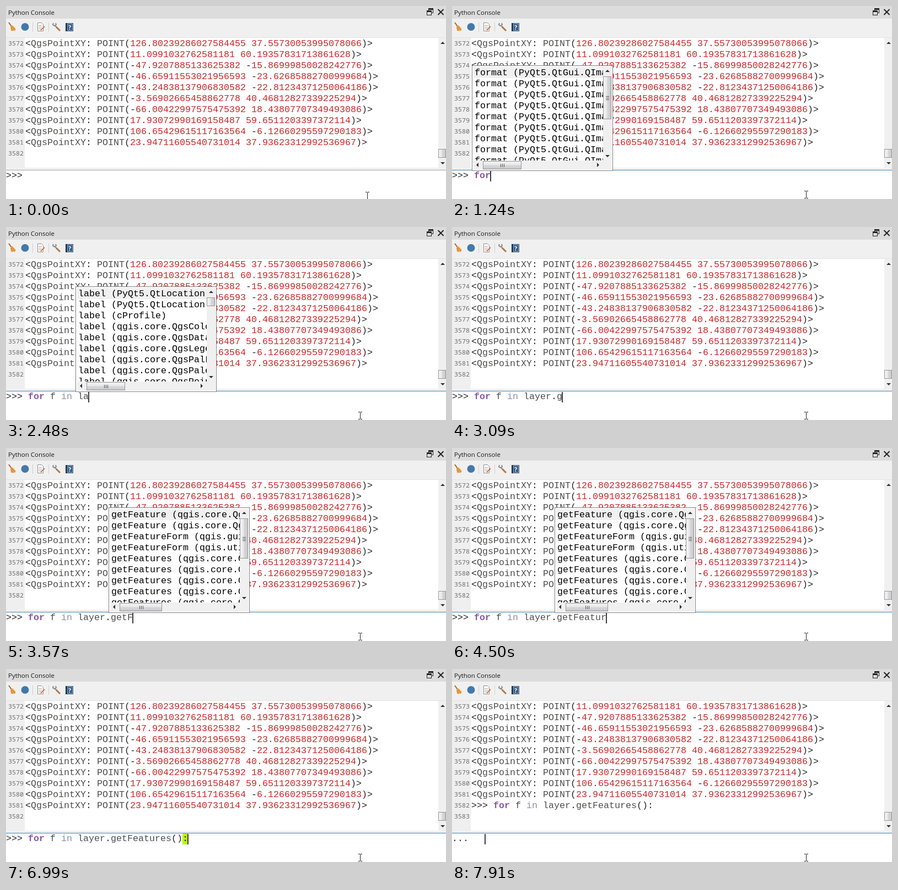
Animation of 798x351 px, one loop 8 s. Source, as an HTML page with a canvas:

```html
<!DOCTYPE html>
<html lang="en">
<head>
<meta charset="utf-8">
<title>Python Console</title>
<style>
  html, body { margin: 0; width: 100%; height: 100%; overflow: hidden; background: #fff; }
  canvas { display: block; }
</style>
</head>
<body>
<canvas id="stage" width="798" height="351"></canvas>
<script>
const ctx = document.getElementById('stage').getContext('2d');
const LOOP = 8000, CELL = 10, ROW = 20;
const MONO = '16.667px "Liberation Mono", monospace';
const INK = '#4d4d4c', OPERATOR = '#262626', LIME = '#b7f907';

const POINTS = [
  '126.80239286027584455 37.55730053995078066',
  '11.0991032762581181 60.19357831713861628',
  '-47.9207885133625382 -15.86999850028242776',
  '-46.65911553021956593 -23.62685882700999684',
  '-43.24838137906830582 -22.81234371250064186',
  '-3.56902665458862778 40.46812827339225294',
  '-66.00422997575475392 18.43807707349493086',
  '17.93072990169158487 59.6511203397372114',
  '106.65429615117163564 -6.12660295597290183',
  '23.94711605540731014 37.93623312992536967'
].map(p => `<QgsPointXY: POINT(${p})>`);
const COMMAND = 'for f in layer.getFeatures():';

// One time per typed character of COMMAND; the first entry is the focus click.
const KEY_TIMES = [450, 910, 1050, 1170, 1300, 1480, 1660, 1850, 2020, 2140, 2310, 2480,
  2630, 2720, 2830, 2940, 3090, 3240, 3400, 3570, 3740, 3920, 4100, 4250, 4500, 4810,
  5190, 6200, 6590, 6990];
const ENTER = 7300, INDENT_TIMES = [7740, 7910];

const repeat = (n, text) => Array(n).fill(text);
const COMPLETIONS = [
  'focalPoint (PyQt5.QtGui.QRadialGradient)', 'focalRadius (PyQt5.QtGui)',
  'focus (PyQt5.QtQuick.QQuickItem)', 'focusChanged (PyQt5.QtGui)', 'font (PyQt5.QtGui.QPainter)',
  ...repeat(9, 'format (PyQt5.QtGui.QImage)'), ...repeat(6, 'formatName (qgis.core.Qgs)'),
  ...repeat(4, 'inBounds (qgis.core.QgsMesh)'), ...repeat(8, 'index (PyQt5.QtCore.QModel)'),
  ...repeat(2, 'label (PyQt5.QtLocation.QPlaceSearch)'), 'label (cProfile)',
  ...['ColorRampShader', 'DataDefined', 'LegendStyle', 'PalLayer', 'PalettedRaster', 'PointCluster']
    .map(name => `label (qgis.core.Qgs${name})`),
  ...repeat(16, 'layer (qgis.core.QgsMapLayer)'),
  ...repeat(3, 'geometry (qgis.core.QgsFeature)'), ...repeat(2, 'get (qgis.core.QgsCache)'),
  'getAbstract (qgis.core)', 'getCoordinates (qgis.core)', 'getContext (qgis.core)',
  ...repeat(2, 'getFeature (qgis.core.QgsVectorLayer)'),
  'getFeatureForm (qgis.gui.QgisInterface)', 'getFeatureForm (qgis.utils.iface)',
  ...repeat(11, 'getFeatures (qgis.core.QgsVectorLayer)'), 'getFeatureInfo (qgis.core)'
];
const CALL_TIP = 'getFeatures(self, request: QgsFeatureRequest = QgsFeatureRequest())';

function rect(x, y, w, h, fill) {
  ctx.fillStyle = fill;
  ctx.fillRect(x, y, w, h);
}
function frame(x, y, w, h, stroke) {
  ctx.strokeStyle = stroke;
  ctx.lineWidth = 1;
  ctx.strokeRect(x + .5, y + .5, w - 1, h - 1);
}
function text(str, x, y, color = INK, font = MONO) {
  ctx.font = font;
  ctx.fillStyle = color;
  ctx.fillText(str, x, y);
}
function line(color, width, ...points) {
  ctx.strokeStyle = color;
  ctx.lineWidth = width;
  ctx.beginPath();
  points.forEach(([x, y]) => ctx.lineTo(x, y));
  ctx.stroke();
}
function polygon(color, ...points) {
  ctx.fillStyle = color;
  ctx.beginPath();
  points.forEach(([x, y]) => ctx.lineTo(x, y));
  ctx.fill();
}
function disc(x, y, r, color) {
  ctx.fillStyle = color;
  ctx.beginPath();
  ctx.arc(x, y, r, 0, 7);
  ctx.fill();
}
// Small triangle pointing along (dx, dy).
function arrow(x, y, dx, dy) {
  polygon('#303030', [x + 2 * dx, y + 2 * dy],
    [x - 2 * dx + 4 * dy, y - 2 * dy + 4 * dx], [x - 2 * dx - 4 * dy, y - 2 * dy - 4 * dx]);
}

function code(str, x, y) {
  for (const { 0: token, index } of str.matchAll(/\d[\d.]*|[A-Za-z]\w*|[^\w\s]/g)) {
    let color = INK, font = MONO;
    if (/^\d/.test(token)) color = '#c82829';
    else if (/^\W/.test(token)) color = OPERATOR;
    else if (token === 'in') color = '#8a8fa0';
    else if (token === 'for') {
      color = '#8959a8';
      font = 'bold ' + MONO;
    }
    text(token, x + index * CELL, y, color, font);
  }
}

function thumb(x, y, w, h, vertical) {
  const shade = vertical ? ctx.createLinearGradient(x, 0, x + w, 0) : ctx.createLinearGradient(0, y, 0, y + h);
  shade.addColorStop(0, '#f5f5f5');
  shade.addColorStop(.45, '#e9e9eb');
  shade.addColorStop(.5, '#d9dadc');
  shade.addColorStop(1, '#c6c6c9');
  rect(x, y, w, h, shade);
  frame(x, y, w, h, '#979797');
  for (let i = -1; i <= 1 && Math.max(w, h) > 18; i++) {
    const cx = Math.round(x + w / 2), cy = Math.round(y + h / 2);
    if (vertical) rect(cx - 3, cy + 3 * i, 6, 1, '#555');
    else rect(cx + 3 * i, cy - 3, 1, 6, '#555');
  }
}

function drawTitleBar() {
  rect(0, 0, 798, 23, '#dcdcdc');
  text('Python Console', 4, 16, '#1a1a1a', '11.5px "Open Sans", sans-serif');
  for (const [x, y] of [[766, 4], [763, 8]]) {
    rect(x, y, 9, 9, '#dcdcdc');
    frame(x, y, 9, 9, '#222');
    rect(x, y, 9, 3, '#222');
  }
  line('#222', 2, [783.5, 6], [793.5, 16]);
  line('#222', 2, [793.5, 6], [783.5, 16]);
}

function drawToolbar() {
  rect(0, 23, 798, 34, '#f0f0f0');
  line('#a8642a', 2, [5, 30], [10, 37]);
  polygon('#f0a848', [8, 38], [12, 35], [18, 42], [16, 45], [9, 45]);
  line('#c0702a', 1, [9, 38], [12, 45]);
  line('#c0702a', 1, [11, 37], [16, 44]);
  disc(34.5, 38, 7, '#4279ab');
  for (const x of [48, 77]) rect(x, 30, 1, 17, '#d0d0d0');
  polygon('#fff', [57, 30], [65, 30], [68, 33], [68, 46], [57, 46]);
  line('#8c8c8c', 1, [57.5, 30.5], [64.5, 30.5], [67.5, 33.5], [67.5, 45.5], [57.5, 45.5], [57.5, 30.5]);
  for (const y of [35, 38, 41]) rect(59, y, 6, 1, '#aaa');
  line('#d9773d', 2, [70, 37], [63, 44]);
  line('#8d8d8d', 2, [86, 31], [85, 34], [88, 36], [91, 34], [90, 31]);
  line('#8d8d8d', 2, [88, 35], [92, 39]);
  line('#b9763f', 3, [91, 38], [98, 45]);
  rect(108, 31, 14, 15, '#34597f');
  rect(108, 31, 3, 15, '#203a58');
  frame(111, 32, 10, 13, '#8fa9c4');
  text('?', 113, 43, '#fff', 'bold 11px "Open Sans", sans-serif');
}

function drawOutput(entered) {
  rect(0, 57, 34, 238, '#efefef');
  rect(784, 57, 14, 237, '#f0f0f0');
  rect(0, 57, 798, 1, '#e3e3e3');
  arrow(792, 67, 0, -1);
  arrow(792, 286, 0, 1);
  thumb(784, 260, 14, 16, true);
  const lines = entered ? [...POINTS.slice(1), '>>> ' + COMMAND] : POINTS;
  for (let i = 0; i <= 10; i++) {
    const y = 73 + i * ROW;
    text(3572 + i + entered, 4, y - 1, '#6d6d6d', '11.667px "Noto Sans Mono", monospace');
    code(lines[i] || '', 35, y);
  }
  rect(0, 294, 798, 4, '#f0f0f0');
}

function drawPopup(prefix, x) {
  const y = 108, items = COMPLETIONS.filter(item => item.startsWith(prefix));
  rect(x, y, 256, 192, '#fff');
  ctx.save();
  ctx.beginPath();
  ctx.rect(x + 3, y + 3, 235, 170);
  ctx.clip();
  rect(x + 3, y + 3, 235, ROW, '#f0f0f0');
  items.slice(0, 9).forEach((item, i) => text(item, x + 5, y + 18 + i * ROW, '#000'));
  ctx.restore();
  rect(x + 238, y + 3, 16, 170, '#f0f0f0');
  arrow(x + 246, y + 10, 0, -1);
  arrow(x + 246, y + 165, 0, 1);
  const height = prefix.length < 3 ? 16 : Math.max(16, Math.min(138, 138 * 8.5 / items.length));
  thumb(x + 238, y + 20, 15, Math.round(height), true);
  rect(x + 3, y + 173, 251, 17, '#f0f0f0');
  arrow(x + 10, y + 181, -1, 0);
  arrow(x + 229, y + 181, 1, 0);
  thumb(x + 20, y + 174, prefix[0] === 'g' ? 77 : 70, 15, false);
  frame(x, y, 256, 192, '#828282');
}

function drawCallTip() {
  rect(172, 320, 626, 23, '#fff');
  frame(172, 320, 640, 23, '#a0a0a0');
  rect(174, 322, 13, 19, '#e4e4e4');
  arrow(180, 332, 0, 1);
  text(CALL_TIP, 190, 336, '#7f7f7f');
}

function drawInput(t, entered) {
  const keys = entered ? [ENTER, ...INDENT_TIMES] : KEY_TIMES;
  const pressed = keys.filter(time => time <= t);
  const typed = entered ? ' '.repeat(pressed.length - 1) : COMMAND.slice(0, Math.max(0, pressed.length - 1));
  const end = 40 + typed.length * CELL;

  rect(0, 298, 798, 53, '#fff');
  rect(0, 298, 798, 1, t < 450 ? '#a3a5a9' : t < 530 ? '#7396b4' : '#3c88b8');
  if (/[(:]$/.test(typed)) rect(end - CELL, 299, CELL, ROW, LIME);
  if (typed.endsWith(')')) rect(end - 2 * CELL, 299, 2 * CELL, ROW, LIME);
  text(entered ? '...' : '>>>', 0, 313, OPERATOR);
  code(typed, 40, 313);
  if (pressed.length && t - pressed[pressed.length - 1] < 460) rect(end - 1, 300, 2, 19, '#3c3c3c');

  const word = typed.match(/\w{2,}$/);
  if (word) drawPopup(word[0], 36 + word.index * CELL);
  if (t >= 6300 && t < 6590) drawCallTip();
}

function drawPointer(t) {
  const [x, y] = t < 70 ? [655, 338] : [642, 336];
  rect(x, y + 1, 1, 12, '#222');
  for (const edge of [y, y + 13]) {
    rect(x - 3, edge, 3, 1, '#222');
    rect(x + 1, edge, 3, 1, '#222');
  }
}

function draw() {
  const t = performance.now() % LOOP, entered = +(t >= ENTER);
  rect(0, 0, 798, 351, '#fff');
  drawTitleBar();
  drawToolbar();
  drawOutput(entered);
  drawInput(t, entered);
  drawPointer(t);
  requestAnimationFrame(draw);
}
draw();
</script>
</body>
</html>
```
